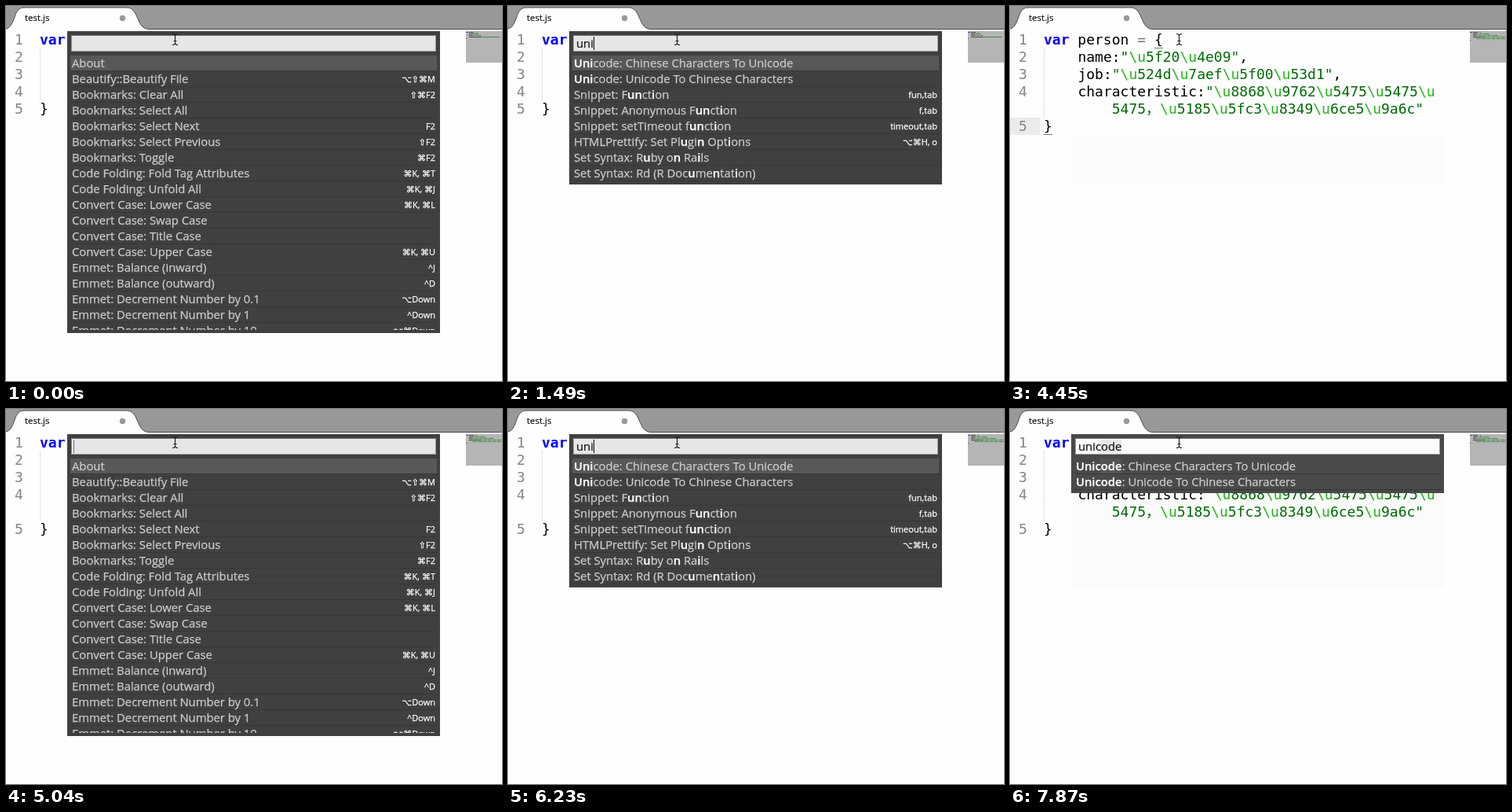
Write an HTML page that moves like this. It is 632 px wide and 477 px high and loops after 8 s.

```html
<!DOCTYPE html>
<html lang="en">
<head>
<meta charset="utf-8">
<title>Command palette</title>
<style>
  html, body { margin: 0; width: 632px; height: 477px; overflow: hidden; background: #fefefe; }
  div, svg { position: absolute; left: 0; top: 0; }
  #stage { width: 632px; height: 477px; overflow: hidden; font-family: "Open Sans", "Noto Sans", sans-serif; white-space: pre; }
  #title { left: 24px; top: 7px; font-size: 11.5px; line-height: 16px; color: #111; -webkit-text-stroke: .2px; }
  #code { font: 18px/22px "DejaVu Sans Mono", "Noto Sans CJK SC", "Noto Sans CJK", monospace; color: #000; }
  #code .num { left: 11px; color: #858585; }
  #active { left: 0; top: 142px; width: 38px; height: 22px; background: #ebebeb; }
  #guide { left: 43px; top: 54px; border-left: 1px dotted #ccc; }
  #ghost { left: 78px; width: 475px; background: #fbfbfb; }
  .match { width: 11px; height: 1px; background: #777; }
  .caret { width: 1px; background: #000; }
  #map { left: 586px; top: 32px; width: 46px; height: 40px; background: #b5b5b5; overflow: hidden; }
  #map div { height: 1px; opacity: .6; }
  #palette { left: 78px; top: 32px; width: 475px; overflow: hidden; font-size: 14.8px; }
  #field { left: 5px; top: 5px; width: 463px; height: 19px; border: 1px solid #999; border-top-color: #777; }
  #query { left: 9px; top: 6px; line-height: 19px; color: #111; -webkit-text-stroke: .2px; }
  #list { left: 4px; top: 31px; width: 467px; overflow: hidden; }
  .row { width: 467px; height: 19px; border-bottom: 1px solid #373737; line-height: 19px; color: #ccc; -webkit-text-stroke: .25px; }
  .row span { position: absolute; left: 2px; }
  .row b { color: #fff; font-weight: 600; }
  .row i { position: absolute; right: 2px; font: 500 11px/19px "Open Sans", "DejaVu Sans", sans-serif; color: #fff; }
  #bar { left: 462px; top: 33px; width: 7px; height: 318px; border-radius: 4px; background: rgba(28, 28, 28, .8); }
</style>
</head>
<body>
<div id="stage"><svg width="632" height="32" viewBox="0 0 632 32">
    <path d="M0 0H632V29.5H0Z" fill="#989898"/>
    <path d="M-3 29.5C6 29 8 22 11 14C14 5 17 2 24 2H153C160 2 163 5 167 14C171 23 173 29 182 29.5V32H-3Z" fill="#fefefe"/>
    <path d="M-3 29.5C6 29 8 22 11 14C14 5 17 2 24 2H153C160 2 163 5 167 14C171 23 173 29 182 29.5H632" fill="none" stroke="#4c4c4c"/>
    <circle cx="148.500" cy="15.500" r="3.700" fill="#999"/>
  </svg>
  <div id="title">test.js</div>
  <div id="ghost"></div>
  <div id="code"></div>
  <div id="map"></div>
  <div id="palette"></div>
  <svg width="632" height="60" viewBox="0 0 632 60" fill="none">
    <path d="M212 35.500Q215.500 35.500 215.500 38V47Q215.500 49.500 212 49.500M219 35.500Q215.500 35.500 215.500 38M215.500 47Q215.500 49.500 219 49.500M213.500 44.500H217.500" stroke="#222" stroke-width="1.200"/>
  </svg>
</div>
<script>
const $ = id => document.getElementById(id);
const LOOP = 8000, CHAR = 10.84, CONVERTED = 2970, REOPENED = 4750;

// time, typed text (null when the palette is closed), caret opacity
const steps = [
  [0, '', 0], [150, 'u', 1], [600, 'u', .5], [750, 'un', 1], [1200, 'un', .5], [1350, 'un', 0],
  [1490, 'uni', 1], [1780, 'unic', 1], [1930, 'unico', 1], [2070, 'unicod', 1], [2220, 'unicode', 1],
  [2670, 'unicode', .5], [2820, 'unicode', 0],
  [2970, null, 1], [3410, null, .5], [3560, null, 0], [4010, null, .5], [4160, null, 1], [4300, null, .5], [4450, null, 0],
  [4750, '', 1], [5040, '', .5], [5190, '', 0], [5490, 'u', 1], [5790, 'un', 1], [6230, 'uni', 1],
  [6380, 'unic', 1], [6680, 'unico', 1], [6980, 'unicod', 1], [7280, 'unicode', 1],
  [7570, 'unicode', .5], [7720, 'unicode', .25], [7870, 'unicode', 0]
];

const all = `About
Beautify::Beautify File|⌥⇧⌘M
Bookmarks: Clear All|⇧⌘F2
Bookmarks: Select All
Bookmarks: Select Next|F2
Bookmarks: Select Previous|⇧F2
Bookmarks: Toggle|⌘F2
Code Folding: Fold Tag Attributes|⌘K, ⌘T
Code Folding: Unfold All|⌘K, ⌘J
Convert Case: Lower Case|⌘K, ⌘L
Convert Case: Swap Case
Convert Case: Title Case
Convert Case: Upper Case|⌘K, ⌘U
Emmet: Balance (inward)|^J
Emmet: Balance (outward)|^D
Emmet: Decrement Number by 0.1|⌥Down
Emmet: Decrement Number by 1|^Down
Emmet: Decrement Number by 10|⌥⌘Down`.split('\n');

const some = `Unicode: Chinese Characters To Unicode
Unicode: Unicode To Chinese Characters
Code Folding: Unfold All|⌘K, ⌘J
Package Control: List Unmanaged Packages
Minify::User File Settings
Snippet: Function|fun,tab
Snippet: Anonymous Function|f,tab
Snippet: setTimeout function|timeout,tab
Snippet: #!/usr/bin/env|!env,tab
HTMLPrettify: Set Plugin Options|⌥⌘H, o
Set Syntax: Ruby on Rails
Emmet: Previous Edit Point|^⌥Left
Minify::Default File Settings
Emmet: Evaluate Math Expression|⇧⌘Y
Set Syntax: MultiMarkdown
Set Syntax: Regular Expression
Set Syntax: SFTP Output Panel
Set Syntax: Regular Expressions (Python)`.split('\n');

const few = [0, 1, 5, 6, 7, 9, 10].map(i => some[i]).concat('Set Syntax: Rd (R Documentation)');
const lists = [all, some, some, few];
const rowsFor = query => lists[query.length] || some.slice(0, 2);

const plain = ['var person = {', '    name:"张三",', '    job:"前端开发",',
  '    characteristic:"表面呵呵呵，内心草泥马"', '}'];
const escaped = ['var person = {', '    name:"\\u5f20\\u4e09",', '    job:"\\u524d\\u7aef\\u5f00\\u53d1",',
  '    characteristic:"\\u8868\\u9762\\u5475\\u5475\\u', '        5475，\\u5185\\u5fc3\\u8349\\u6ce5\\u9a6c"', '}'];

// Split one line into [text, colour] runs
function colourRuns(line) {
  const start = /^ +5475/.test(line) ? 8 : line.indexOf('"');
  const close = line.lastIndexOf('"');
  const end = close > start ? close : line.length;
  let at = 0;
  return line.match(/\\u|var|=|"|[a-z0-9]+|[^\\"=]/g).map(text => {
    const inside = start >= 0 && at >= start && at <= end;
    at += text.length;
    const colour = text === '\\u' ? '#26b31a' : inside ? '#036a07' :
      text === 'var' ? '#00f' : text === '=' ? '#687687' : '#000';
    return [text, colour];
  });
}

const box = (style, body = '', name = '') => `<div class="${name}" style="${style}">${body}</div>`;

function drawCode(lines, closed, caret) {
  const last = lines.length - 1;
  const rowOf = i => 32 + 22 * i;
  // The fourth line wraps once its text is escaped
  const wraps = lines === escaped;
  const shownLines = wraps ? lines : lines;
  let html = `<div id="guide" style="height:${22 * (last - 1)}px"></div>`;
  if (closed) html += '<div id="active"></div>';
  shownLines.forEach((line, i) => {
    const text = colourRuns(line).map(([t, c]) =>
      `<span style="color:${c}${t === 'var' ? ';font-weight:bold' : ''}">${t}</span>`).join('');
    const number = i === last ? 5 : i < 4 ? i + 1 : '';
    html += box(`top:${rowOf(i)}px`, number, 'num') + box(`left:43px;top:${rowOf(i)}px`, text);
  });
  if (closed) {
    html += box(`left:${43 + 13 * CHAR}px;top:53px`, '', 'match') + box('left:43px;top:163px', '', 'match');
    html += box(`left:53px;top:142px;height:22px;opacity:${caret}`, '', 'caret');
  }
  $('code').innerHTML = html;
}

function drawMap(lines) {
  $('map').innerHTML = lines.map((line, i) => {
    let x = 0;
    return colourRuns(line).map(([t, c]) => {
      const left = x, width = [...t].reduce((n, ch) => n + (ch > '\u2e80' ? 2 : 1), 0);
      x += width;
      return t === ' ' ? '' : box(`left:${left}px;top:${1 + 2 * i}px;width:${width}px;background:${c}`);
    }).join('');
  }).join('');
}

// Embolden the matched letters, preferring adjacent ones
function mark(label, query) {
  const low = label.toLowerCase();
  let at = Math.max(0, low.indexOf(query.slice(0, 2))), html = '', from = 0;
  for (const ch of query) {
    at = low.indexOf(ch, at);
    if (at < 0) break;
    html += label.slice(from, at) + `<b>${label[at]}</b>`;
    from = ++at;
  }
  return (html + label.slice(from)).replace(/<\/b><b>/g, '');
}

function drawPalette(query, caret, again) {
  const rows = rowsFor(query), late = query.length > 3;
  const height = Math.min(349, rows.length * 20);
  const end = [8, 17, 26, 31, 37, 47, 56, 64][query.length];
  const dim = late && again;
  const list = rows.map((row, i) => {
    const [label, keys = ''] = row.split('|');
    const fill = dim ? '#4a4a4a' : i ? '#404040' : '#585858';
    const patch = dim && !i && end > 37 ? box(`left:33px;width:${end - 37}px;height:19px;background:#555`) : '';
    return box(`top:${20 * i}px;background:${fill}`, `${patch}<span>${mark(label, query)}</span><i>${keys}</i>`, 'row');
  }).join('');
  const palette = $('palette');
  palette.style.height = height + 35 + 'px';
  palette.style.background = late ? '#494949' : '#404040';
  palette.innerHTML =
    `<div id="field" style="background:${late ? '#fbfbfb' : '#e6e6e6'}"></div>` +
    (end > 37 ? box(`left:37px;top:7px;width:${end - 37}px;height:17px;background:#e8e8e8`) : '') +
    `<div id="query">${query}</div>` +
    box(`left:${end}px;top:7px;height:17px;opacity:${caret}`, '', 'caret') +
    `<div id="list" style="height:${height}px">${list}</div>` +
    (rows === some ? '<div id="bar"></div>' : '');
}

function draw([time, query, caret]) {
  const closed = query === null;
  const lines = time < CONVERTED ? plain : escaped;
  const ghost = $('ghost').style;
  const top = closed ? 166 : 107;
  ghost.display = closed || query.length > 3 ? 'block' : 'none';
  ghost.top = top + 'px';
  ghost.height = 227 - top + 'px';
  drawCode(lines, closed, caret);
  drawMap(lines);
  $('palette').style.display = closed ? 'none' : 'block';
  if (!closed) drawPalette(query, caret, time >= REOPENED);
}

let shown, began;
function tick(now) {
  began ??= now;
  const t = (now - began) % LOOP;
  const step = steps.findLast(s => s[0] <= t);
  if (step !== shown) draw(shown = step);
  requestAnimationFrame(tick);
}
draw(shown = steps[0]);
requestAnimationFrame(tick);
</script>
</body>
</html>
```
